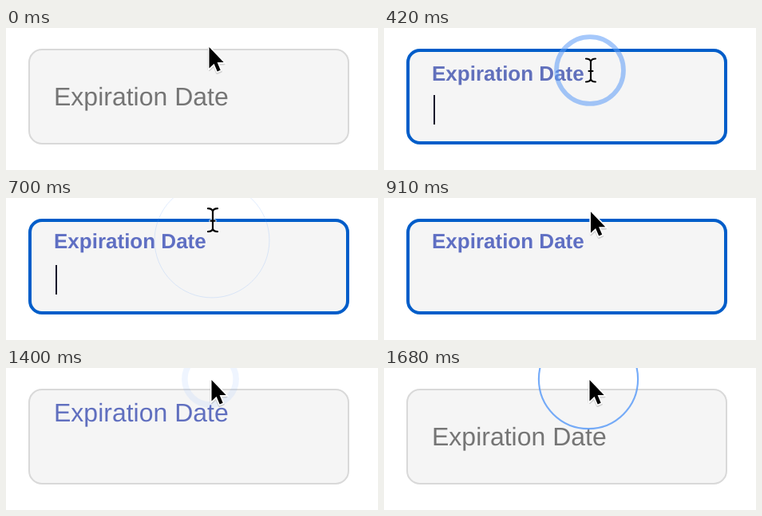
An HTML page for the animation above (1.75 s loop, 466x178 px).

```html
<!DOCTYPE html>
<html lang="en">
<head>
<meta charset="utf-8">
<title>Floating label field</title>
<style>
  html, body { margin: 0; width: 100%; height: 100%; overflow: hidden; background: #fff; }
  svg { display: block; width: 466px; height: 178px; }
  text { font-family: "Liberation Sans", Helvetica, Arial, sans-serif; text-rendering: geometricPrecision; }
</style>
</head>
<body>
<svg viewBox="0 0 466 178">
  <rect id="field" fill="#f5f5f5"/>
  <text id="label" x="60">Expiration Date</text>
  <rect id="caret" x="62" y="84" width="2" height="37" fill="#16162a"/>
  <circle id="ring" fill="none" stroke="#5f9ef8"/>
  <g id="arrow">
    <path d="M0 0V26.5L6.1 20.8L10.2 30.4L14.2 28.7L10.1 19.1H18.2Z" fill="#000" opacity=".14"
      stroke="#000" stroke-width="4" stroke-linejoin="round" transform="translate(0 1.5)"/>
    <path d="M0 0V26.5L6.1 20.8L10.2 30.4L14.2 28.7L10.1 19.1H18.2Z" stroke="#fff" stroke-width="3.2"
      paint-order="stroke"/>
  </g>
  <g id="beam" fill="none" stroke-linecap="round">
    <path id="beamHalo" stroke="#fff" stroke-width="4.4" opacity=".8"/>
    <path id="beamLine" stroke="#000" stroke-width="2.2"/>
  </g>
</svg>
<script>
const LOOP = 1750, STEP = 70;
const FOCUS = 325, BLUR = 1390, FADE = 150, BLINK = 500;
const GREY = [117, 117, 117], PURPLE = [95, 111, 195];
const FIELD = { left: 28, top: 26, width: 402, height: 120, radius: 17 };
const CLICKS = [{ at: 308, x: 258, y: 53 }, { at: 1380, x: 256, y: 14 }];

const el = id => document.getElementById(id);
const set = (id, attrs) => {
  for (const name in attrs) el(id).setAttribute(name, attrs[name]);
};
const show = (id, on) => set(id, { visibility: on ? "visible" : "hidden" });
const clamp = v => Math.min(1, Math.max(0, v));
const mix = (a, b, k) => a + (b - a) * k;
const progress = (t, start, length) => clamp((t - start) / length);
const easeOut = (k, power) => 1 - (1 - k) ** power;

// CSS "ease": cubic-bezier(.25, .1, .25, 1)
function ease(x) {
  const bezier = (a, b, u) => 3 * a * u * (1 - u) ** 2 + 3 * b * u * u * (1 - u) + u ** 3;
  let low = 0, high = 1;
  for (let i = 0; i < 24; i++) {
    const mid = (low + high) / 2;
    if (bezier(.25, .25, mid) < x) low = mid; else high = mid;
  }
  return bezier(.1, 1, low);
}

function pointer(t) {
  if (t < 560) {
    const k = easeOut(progress(t, 0, 280), 2);
    return [mix(254.5, 259, k), mix(24, 53, k)];
  }
  if (t < 1190) {
    const k = easeOut(progress(t, 560, 420), 3);
    return [mix(259, 259, k), mix(53, 17, k)];
  }
  return t < 1330 ? [258.5, 17] : [257.5, 15];
}

function drawField(t) {
  const focused = t >= FOCUS && t < BLUR;
  const stroke = focused ? 4 : 2;
  set("field", {
    x: FIELD.left + stroke / 2, y: FIELD.top + stroke / 2,
    width: FIELD.width - stroke, height: FIELD.height - stroke,
    rx: FIELD.radius - stroke / 2,
    stroke: focused ? "#005dc9" : "#d9d9d9", "stroke-width": stroke
  });

  const lift = ease(progress(t, FOCUS, FADE)) - ease(progress(t, BLUR, FADE));
  const color = GREY.map((c, i) => Math.round(mix(c, PURPLE[i], lift)));
  set("label", {
    y: (focused ? 95 : 97) - 32 * lift,
    "font-size": focused ? 26 : 32,
    "font-weight": focused ? 700 : 400,
    fill: `rgb(${color})`
  });
  show("caret", focused && t < FOCUS + BLINK);
}

function drawRing(t) {
  const click = CLICKS.findLast(c => t >= c.at);
  const age = click ? t - click.at : 0;
  const radius = 30 + age * .107;
  const visible = click && radius < 74;
  show("ring", visible);
  if (!visible) return;
  set("ring", {
    cx: click.x, cy: click.y, r: radius,
    "stroke-width": Math.max(.6, (74 - radius) * .18),
    opacity: Math.min(.85, age * .005) * clamp((75 - radius) / 8)
  });
}

function drawPointer(t) {
  const [x, y] = pointer(t);
  const overField = y > 27;
  show("beam", overField);
  show("arrow", !overField);
  set(overField ? "beam" : "arrow", { transform: `translate(${x} ${y})` });
}

function draw(t) {
  drawField(t);
  drawRing(t);
  drawPointer(t);
}

const beamPath = "M-6 -14.5Q-1 -14.5 0 -11Q1 -14.5 6 -14.5M0 -11V11M-6 14.5Q-1 14.5 0 11Q1 14.5 6 14.5M-2.5 1H2.5";
set("beamHalo", { d: beamPath });
set("beamLine", { d: beamPath });

const start = performance.now();
function tick() {
  const t = (performance.now() - start) % LOOP;
  draw(Math.floor(t / STEP) * STEP);
  requestAnimationFrame(tick);
}
tick();
</script>
</body>
</html>
```
